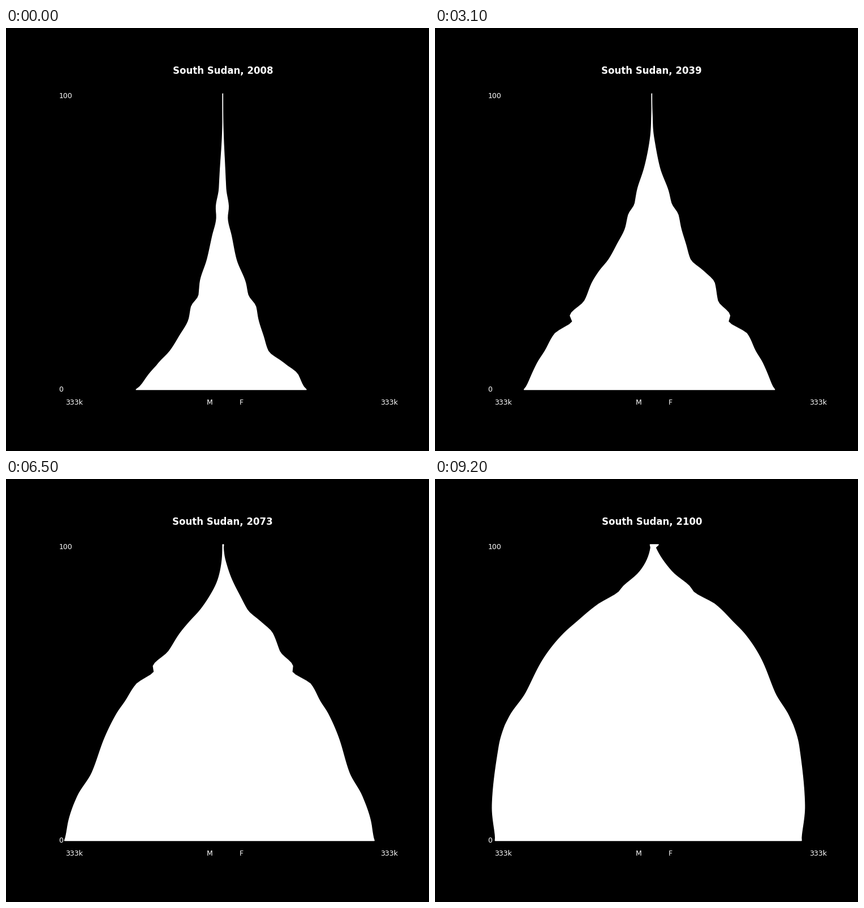
Animation, 748 px wide and 748 px high, one loop 9300 ms. Source, as a matplotlib script:

```python
import matplotlib.pyplot as plt
import numpy as np
from matplotlib.animation import FuncAnimation

SIZE, DPI = 748, 100
FIRST, LAST = 2008, 2100
SETTLED = 2028                 # early losses of young cohorts end here
AGES = np.arange(101)

# Birth year, then cohort size for men and women, in pixels of bar length.
COHORTS = np.array([
    (1908, 10, 5), (1930, 15, 8), (1940, 13.6, 9), (1946, 20, 14.3),
    (1950, 17, 11), (1956, 25, 18.5), (1964, 34, 27), (1972, 46, 43.4),
    (1976, 46.6, 46.8), (1980, 59.6, 60), (1984, 62, 62.5), (1990, 77, 70.3),
    (1995, 91, 77), (1999, 108, 101.6), (2003, 120, 121), (2009, 130.5, 124.3),
    (2014, 155, 145), (2016, 149.2, 141.2), (2018, 163.5, 156.3),
    (2020, 179.3, 173.5), (2026, 194.5, 187), (2030, 206, 198.3),
    (2038, 221, 212.8), (2050, 237, 227.3), (2058, 259.5, 248),
    (2068, 275, 263.4), (2088, 284, 271.5), (2100, 275.5, 263.3)])


def smooth(x, xp, fp):
    """Monotone cubic through the points (xp, fp)."""
    h = np.diff(xp)
    d = np.diff(fp) / h
    prod, total = d[:-1] * d[1:], d[:-1] + d[1:]
    inner = np.where(prod > 0, 2 * prod / np.where(prod > 0, total, 1), 0)
    m = np.concatenate([d[:1], inner, d[-1:]])
    i = np.clip(np.searchsorted(xp, x, "right") - 1, 0, len(h) - 1)
    t, w = (x - xp[i]) / h[i], h[i]
    return ((1 + 2 * t) * (1 - t) ** 2 * fp[i] + t * (1 - t) ** 2 * w * m[i]
            + t * t * (3 - 2 * t) * fp[i + 1] + t * t * (t - 1) * w * m[i + 1])


def widths(year, column, risk):
    """Bar length at every age: cohort size times survival."""
    born = year - AGES
    size = smooth(born, COHORTS[:, 0], COHORTS[:, column])

    # Mortality rises exponentially with age and falls for later cohorts.
    level = np.maximum(0.18, 1 - 0.0155 * (born - FIRST))
    hazard = 0.00302 * AGES + 0.000281 * (np.exp(0.095 * AGES) - 1)
    infants = 0.03 * np.exp(-AGES)

    # Extra people in the early years, gone by the settled year.
    extra = np.interp(born, [1950, 2000, 2008, 2016, 2020, SETTLED],
                      [0.03, 0.08, 0.15, 0.15, 0.05, 0])
    span = np.maximum(SETTLED - np.maximum(born, FIRST), 1)
    left = np.clip((SETTLED - year) / span, 0, 1)

    w = size * np.exp(level * (infants - risk * hazard) + extra * left)
    w[-1] *= 2.6               # the open group of 100 and older
    return w


def pyramid(year):
    men = np.column_stack([-widths(year, 1, 1.0), AGES])
    women = np.column_stack([widths(year, 2, 0.69), AGES])
    return np.vstack([men, women[::-1]])


plt.rcParams["font.family"] = "DejaVu Sans"
fig = plt.figure(figsize=(SIZE / DPI, SIZE / DPI), dpi=DPI, facecolor="black")
ax = fig.add_axes([0.125, 0.11, 0.775, 0.77])
half = 0.775 * SIZE / 2        # one data unit across is one pixel
ax.set(xlim=(-half, half), ylim=(-5, 105))
ax.axis("off")

shape = plt.Polygon(pyramid(FIRST), closed=True, facecolor="white",
                    edgecolor="white", lw=1, joinstyle="bevel")
ax.add_patch(shape)
title = ax.set_title("", fontsize=12, fontweight="bold", color="white")

for x, y, text in [(0, 0.04, "0"), (0, 0.94, "100"), (0.02, 0, "333k"),
                   (0.98, 0, "333k"), (0.45, 0, "M"), (0.55, 0, "F")]:
    ax.text(x, y, text, fontsize=9, color="white", transform=ax.transAxes)


def draw(i):
    year = FIRST + i
    shape.set_xy(pyramid(year))
    title.set_text(f"South Sudan, {year}")
    return shape, title


anim = FuncAnimation(fig, draw, frames=LAST - FIRST + 1, interval=100,
                     repeat=True, repeat_delay=0)
plt.show()
```
